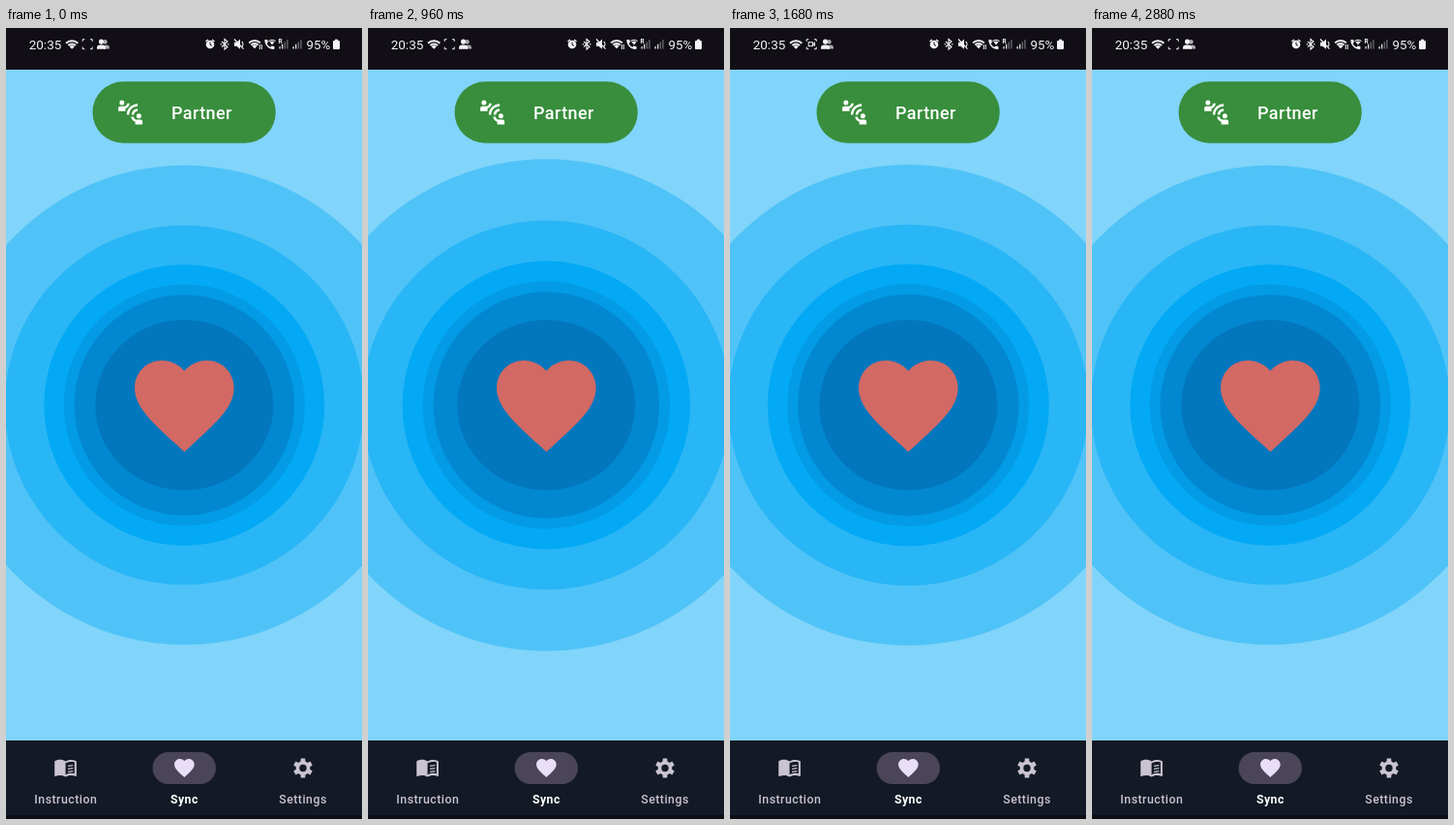
An HTML page with a canvas for the animation above (3000 ms loop, 368x816 px).

```html
<!DOCTYPE html>
<html lang="en">
<head>
<meta charset="utf-8">
<title>Sync pulse</title>
<style>
html, body { margin: 0; width: 100%; height: 100%; overflow: hidden; background: #81d4fa; }
canvas { display: block; width: 368px; height: 816px; }
</style>
</head>
<body>
<canvas id="stage" width="368" height="816"></canvas>
<script>
const ctx = document.getElementById('stage').getContext('2d');
const TAU = Math.PI * 2;
const LOOP = 3000, STEP = 120, PULSE = 1440, PEAK = 787;
const CENTER = { x: 184.3, y: 389 };
const RINGS = [
  [250.9, '#4fc3f7'], [188.3, '#29b6f6'], [147.1, '#03a9f4'],
  [126.4, '#039be5'], [115.5, '#0288d1']
];
const MUTED = '#cac4d0', WHITE = '#f4f3f6';

// Icon outlines on a 24-unit grid
const HEART = new Path2D('M12 21.35l-1.45-1.32C5.4 15.36 2 12.28 2 8.5 2 5.42 4.42 3 7.5 3c1.74 0 3.41.81 4.5 2.09C13.09 3.81 14.76 3 16.5 3 19.58 3 22 5.42 22 8.5c0 3.78-3.4 6.86-8.55 11.54z');
const BOOK = new Path2D('M21 5c-3-1-7-.6-9 1-3-2.2-8.500-2-11 0v14.650c0 .4.4.6.75.45C5 19.500 9.500 19.600 12 21.500c2.500-1.600 7-2.200 10.250-.45.4.2.75-.1.75-.45V6c-.6-.45-1.250-.75-2-1zm0 13.500c-3-.9-6.500-.5-9 1V8c2.500-1.500 6-1.900 9-1z');
const PAIR = new Path2D('M11 14H9c0-4.970 4.030-9 9-9v2c-3.870 0-7 3.130-7 7zm7-3V9c-2.760 0-5 2.240-5 5h2c0-1.660 1.340-3 3-3zM7 4a2 2 0 1 0-4 0 2 2 0 1 0 4 0zm4.450.5h-2C9.210 5.920 7.990 7 6.500 7h-3C2.670 7 2 7.670 2 8.500V11h6V8.740c1.860-.59 3.250-2.230 3.450-4.240zM19 17a2 2 0 1 0 0-4 2 2 0 1 0 0 4zm1.500 1h-3c-1.490 0-2.710-1.080-2.950-2.500h-2c.2 2.010 1.590 3.650 3.450 4.240V22h6v-2.500c0-.83-.67-1.500-1.500-1.500z');
const PHONE = new Path2D('M20 15.400c-1.200 0-2.400-.2-3.500-.6-.4-.1-.8 0-1 .2L13.900 17C11 15.700 8.400 13.100 7 10.200L9 8.500c.3-.3.4-.7.2-1C8.800 6.400 8.600 5.200 8.600 4c0-.5-.4-1-1-1H4.200C3.600 3 3 3.200 3 4c0 9.300 7.700 17 17 17 .7 0 1-.6 1-1.200v-3.400c0-.6-.4-1-1-1z');

function rect(x, y, w, h, color) {
  ctx.fillStyle = color;
  ctx.fillRect(x, y, w, h);
}

function round(x, y, w, h, r, color) {
  ctx.fillStyle = color;
  ctx.beginPath();
  ctx.roundRect(x, y, w, h, r);
  ctx.fill();
}

function oval(x, y, rx, ry, color) {
  ctx.fillStyle = color;
  ctx.beginPath();
  ctx.ellipse(x, y, rx, ry, 0, 0, TAU);
  ctx.fill();
}

function icon(path, x, y, scale, color) {
  ctx.save();
  ctx.translate(x, y);
  ctx.scale(scale, scale);
  ctx.fillStyle = color;
  ctx.fill(path);
  ctx.restore();
}

function line(points, width, color = WHITE) {
  ctx.strokeStyle = color;
  ctx.lineWidth = width;
  ctx.beginPath();
  points.forEach(([x, y]) => ctx.lineTo(x, y));
  ctx.stroke();
}

function arc(x, y, r, from, to, width, color = WHITE) {
  ctx.strokeStyle = color;
  ctx.lineWidth = width;
  ctx.beginPath();
  ctx.arc(x, y, r, from, to);
  ctx.stroke();
}

function text(value, x, y, size, weight, color, align = 'left', spacing = 0) {
  ctx.font = `${weight} ${size}px Roboto, sans-serif`;
  ctx.letterSpacing = spacing + 'px';
  ctx.textAlign = align;
  ctx.fillStyle = color;
  ctx.fillText(value, x, y);
}

function wifi(x, y, size) {
  for (const k of [0.2, 0.56, 0.9]) {
    arc(x, y, size * k, -TAU * 0.375, -TAU * 0.125, size * (k < 0.5 ? 0.4 : 0.21));
  }
}

function signal(x) {
  for (let i = 0; i < 4; i++) {
    const h = 2.5 + i * 2.3;
    rect(x + i * 2.6, 21.5 - h, 1.2, h, i < 2 ? WHITE : '#77757c');
  }
}

function people(x, y) {
  oval(x + 8.5, y + 3, 2.2, 2.4, '#aaa8ae');
  round(x + 7, y + 6.3, 6, 4, [3, 3, 0, 0], '#aaa8ae');
  oval(x + 4.5, y + 2.8, 2.5, 2.6, WHITE);
  round(x, y + 6.2, 9, 4.3, [3, 3, 0, 0], WHITE);
}

function recorder(x, y, on) {
  for (const [sx, sy] of [[-1, -1], [1, -1], [1, 1], [-1, 1]]) {
    line([[x + sx * 5, y + sy * 2.8], [x + sx * 5, y + sy * 5], [x + sx * 2.8, y + sy * 5]], 1);
  }
  if (!on) return;
  ctx.strokeStyle = WHITE;
  ctx.lineWidth = 1;
  ctx.strokeRect(x - 3, y - 2, 4.2, 4);
  line([[x + 1.5, y], [x + 3.3, y - 1.7], [x + 3.3, y + 1.7], [x + 1.5, y]], 1);
}

function statusBar(recording) {
  rect(0, 0, 368, 43, '#110f15');
  text('20:35', 23.7, 21.7, 13.5, 400, WHITE);
  wifi(68.2, 21.8, 9.6);
  recorder(84.2, 16.7, recording);
  people(94, 11.3);

  oval(211, 17, 4.3, 4.3, WHITE);
  line([[206.5, 14], [209, 11.9]], 1.3);
  line([[215.500, 14], [213, 11.9]], 1.3);
  line([[211, 14.5], [211, 17.3], [213, 18.3]], 1, '#110f15');

  line([[223, 14], [229, 19.5], [226, 22], [226, 11.5], [229, 14], [223, 19.5]], 1.1);
  oval(222.300, 16.8, 0.8, 0.8, WHITE);
  oval(229.800, 16.8, 0.8, 0.8, WHITE);

  ctx.fillStyle = WHITE;
  ctx.beginPath();
  [[236, 14.7], [238.5, 14.7], [242, 11.5], [242, 21.7], [238.5, 18.7], [236, 18.7]]
    .forEach(([x, y]) => ctx.lineTo(x, y));
  ctx.fill();
  line([[236, 11.5], [245.5, 21.7]], 1.2);
  arc(241.500, 16.7, 3.5, -0.9, 0.9, 1.1);

  wifi(257, 21.2, 9.2);
  line([[262.300, 17], [262.300, 22]], 1);
  line([[264.300, 17], [264.300, 22]], 1);

  icon(PHONE, 265.700, 10.2, 0.56, WHITE);
  wifi(275, 17.2, 5.5);
  text('R', 281.5, 16, 6.5, 700, WHITE);
  signal(282.5);
  signal(296.5);
  text('95%', 310.6, 21.7, 13.3, 400, WHITE);
  round(338, 13, 7, 9, 1, WHITE);
  rect(340, 11.7, 3, 1.5, WHITE);
}

function gear(x, y) {
  ctx.save();
  ctx.translate(x, y);
  ctx.fillStyle = MUTED;
  ctx.beginPath();
  for (let i = 0; i < 6; i++) {
    const a = i * TAU / 6 - TAU / 4;
    for (const [da, r] of [[-0.34, 7.3], [-0.22, 10.2], [0.22, 10.2], [0.34, 7.3]]) {
      ctx.lineTo(r * Math.cos(a + da), r * Math.sin(a + da));
    }
  }
  ctx.closePath();
  ctx.moveTo(3.7, 0);
  ctx.arc(0, 0, 3.7, 0, TAU);
  ctx.fill('evenodd');
  ctx.restore();
}

function navBar() {
  rect(0, 735, 368, 81, '#131a25');
  rect(0, 812, 368, 4, '#0e0d14');
  icon(BOOK, 49.2, 750.3, 1.03, MUTED);
  for (let y = 761; y < 770; y += 3) line([[64, y + 0.4], [69.300, y - 0.4]], 1.3, MUTED);
  round(151.5, 747, 65.5, 33, 16.5, '#4a4558');
  icon(HEART, 172, 750.9, 1.03, '#e8def8');
  gear(307, 763.5);
  text('Instruction', 61.8, 800, 12.3, 500, MUTED, 'center', 0.5);
  text('Sync', 184.4, 800, 12.3, 700, '#ffffff', 'center', 0.5);
  text('Settings', 307, 800, 12.3, 500, MUTED, 'center', 0.5);
}

function partnerButton() {
  round(89.5, 55.3, 189.3, 63.4, 31.7, '#388e3c');
  icon(PAIR, 113.6, 72, 1.25, '#ffffff');
  text('Partner', 171, 94, 18, 500, '#ffffff', 'left', 0.4);
}

function pulse(time) {
  const scale = 1 + 0.0152 * Math.cos(TAU * (time - PEAK) / PULSE);
  for (const [radius, color] of RINGS) {
    oval(CENTER.x, CENTER.y, radius * scale, radius * scale, color);
  }
  oval(CENTER.x, CENTER.y, 92, 88, '#0277bd');
  icon(HEART, CENTER.x - 61.5, 327.6, 5.13, '#d26964');
}

function draw() {
  const time = Math.floor(performance.now() % LOOP / STEP) * STEP;
  const blink = time % 1000;
  rect(0, 0, 368, 816, '#81d4fa');
  pulse(time);
  partnerButton();
  statusBar(blink >= 220 && blink < 720);
  navBar();
  requestAnimationFrame(draw);
}
draw();
</script>
</body>
</html>
```
